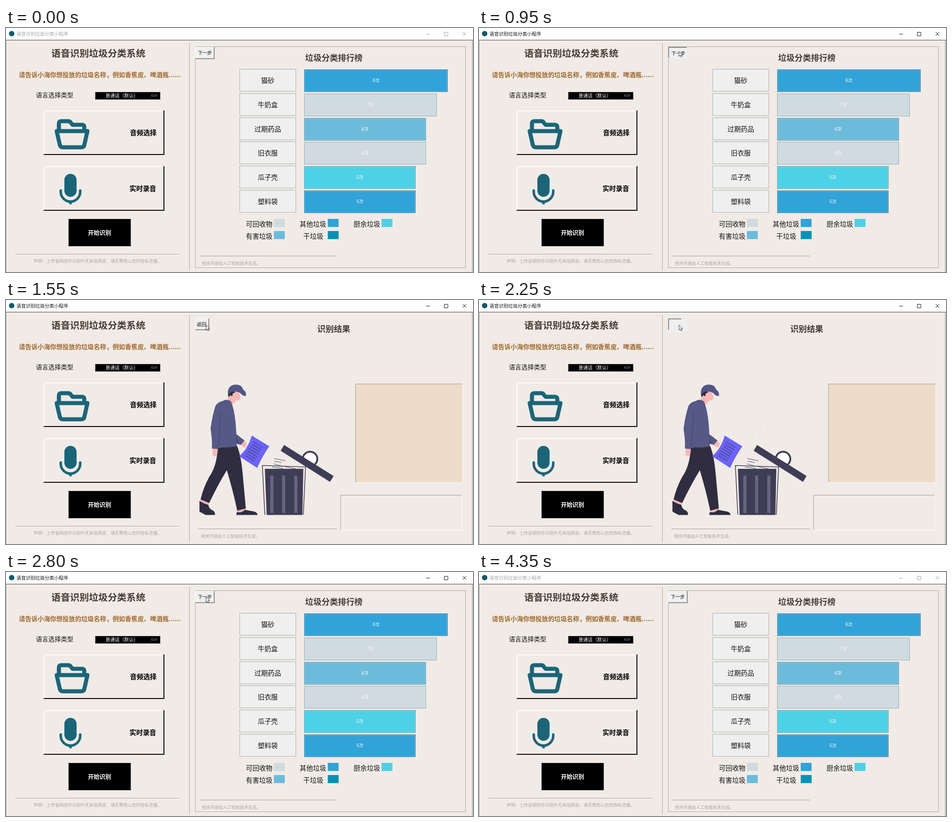
An HTML page that plays this animation: 1032 by 542 pixels, repeating every 4.4 s.

```html
<!DOCTYPE html>
<html lang="zh-CN">
<head>
<meta charset="utf-8">
<style>
html, body { margin: 0; width: 100%; height: 100%; overflow: hidden; background: #f0ebe6; }
svg { display: block; width: 1032px; height: 542px; }
text { font-family: "Noto Sans CJK SC", "Noto Sans CJK", sans-serif; white-space: pre; }
.crisp { shape-rendering: crispEdges; }
</style>
</head>
<body>
<svg id="stage" viewBox="0 0 1032 542"></svg>
<script>
const LOOP = 4400;
const TEAL = '#1b6579', INK = '#473b34', NAVY = '#2f2d3f', JACKET = '#565886', SKIN = '#f9b7b5', BIN = '#3f3d56';
const BLUE = '#30a3d9', PALE = '#cfdbe1', SKY = '#6dbbda', CYAN = '#4dd1e6', DEEP = '#0093b4';

// Vertical position is the middle of the glyphs.
const label = (s, x, mid, size, fill = '#111', extra = '') =>
  `<text x="${x}" y="${(mid + size * .38).toFixed(1)}" font-size="${size}" fill="${fill}" ${extra}>${s}</text>`;
const BOLD = 'font-weight="700"', CENTER = 'text-anchor="middle"';

const box = (x1, y1, x2, y2, fill, extra = '') =>
  `<rect class="crisp" x="${x1}" y="${y1}" width="${x2 - x1}" height="${y2 - y1}" fill="${fill}" ${extra}/>`;
const frame = (x1, y1, x2, y2, stroke, fill = 'none') =>
  box(x1 + .5, y1 + .5, x2 - .5, y2 - .5, fill, `stroke="${stroke}"`);
const bevel = (x1, y1, x2, y2, light, dark, w = 1, fill = 'none') =>
  box(x1, y1, x2, y2, fill) +
  box(x1, y1, x2, y1 + w, light) + box(x1, y1, x1 + w, y2, light) +
  box(x1, y2 - w, x2, y2, dark) + box(x2 - w, y1, x2, y2, dark);
const path = (d, fill, extra = '') => `<path d="${d}" fill="${fill}" ${extra}/>`;
const stroke = (d, color, w = 1, extra = '') => path(d, 'none', `stroke="${color}" stroke-width="${w}" ${extra}`);
const group = (id, body) => `<g id="${id}">${body}</g>`;

function titleBar() {
  return box(0, 0, 1032, 26, '#fff') +
    '<circle cx="12.5" cy="12.5" r="6" fill="#0d5a6c"/>' +
    group('caption',
      label('语音识别垃圾分类小程序', 23, 13, 10.4, 'currentColor') +
      stroke('M928 13.5H937M968.5 9.5H976.5V17.5H968.5ZM1009 9L1017 17M1017 9L1009 17', 'currentColor')) +
    box(0, 26, 1032, 28, '#8e8c8a') + box(0, 28, 1, 542, '#8e8c8a') +
    box(1, 28, 1030, 29, '#fff') + box(1, 28, 2, 542, '#fff') +
    box(1030, 28, 1031, 542, '#8e8c8a');
}

function controls() {
  const card = y => bevel(83, y, 350, y + 99, '#fff', '#000', 2);
  return box(405, 34, 406, 539, '#9c9996') + box(406, 34, 407, 539, '#faf7f4') +
    label('语音识别垃圾分类系统', 100, 56, 20.8, INK, BOLD) +
    label('请告诉小海你想投放的垃圾名称，例如香蕉皮、啤酒瓶......', 28.5, 103.5, 13.8, '#a0692f', BOLD) +
    label('语言选择类型', 66, 149, 13.8) +
    bevel(197, 142, 341, 159, '#55514e', '#3b3835', 1, '#000') +
    label('普通话（默认）', 220, 150.5, 10.3, '#fff') +
    frame(321, 148, 334, 152, '#77736f') +
    card(183) +
    stroke('M117 228V212Q117 207 122 207H138Q141 207 143 210L147 215H168Q173 215 173 220V228' +
      'M112 229H180L173 260Q172 265 167 265H126Q121 265 119 260Z', TEAL, 9, 'stroke-linejoin="round"') +
    label('音频选择', 274, 232, 14.7, '#000', BOLD) +
    card(307) +
    `<rect x="129" y="324" width="27" height="51" rx="13.5" fill="${TEAL}"/>` +
    stroke('M121 361V364A21.5 21.5 0 0 0 164 364V361', TEAL, 5.5, 'stroke-linecap="round"') +
    stroke('M142.5 384V391.5', TEAL, 6) +
    label('实时录音', 273, 356, 14.7, '#000', BOLD) +
    bevel(138, 424, 276, 485, '#3d3a37', '#4d4946', 1, '#000') +
    label('开始识别', 181, 454, 12.8, '#fff', BOLD) +
    box(21, 502, 383, 503, '#9c9996') + box(21, 503, 383, 504, '#faf7f4') +
    label('声明：上传音频除作识别外无其他用途，请无需担心您的隐私泄露。', 61, 517.5, 9.45, '#aaa6a2');
}

const notice = (x, y) =>
  box(x - 6, y - 16, 731, y - 15, '#9c9996') +
  label('相关内容由人工智能技术生成。', x, y, 9.3, '#aaa6a2');

function ranking() {
  const rows = [['猫砂', 8, BLUE], ['牛奶盒', 7, PALE], ['过期药品', 6, SKY],
    ['旧衣服', 6, PALE], ['瓜子壳', 5, CYAN], ['塑料袋', 5, BLUE]];
  const legend = [['可回收物', 530, 592, 0, PALE], ['其他垃圾', 649, 711, 0, BLUE], ['厨余垃圾', 768, 830, 0, CYAN],
    ['有害垃圾', 530, 592, 1, SKY], ['干垃圾', 657, 711, 1, DEEP]];
  return frame(418, 41, 1016, 533, '#aaa6a2') +
    label('垃圾分类排行榜', 661, 66, 18.15, INK, BOLD) +
    rows.map(([name, count, color], i) => {
      const y = Math.round(90.8 + i * 53.85), end = Math.round(786 + count * 23.7);
      return frame(516, y, 641, y + 50, '#aaa9a8', '#efefef') +
        label(name, 578.5, y + 25.5, 14.7, '#111', CENTER) +
        box(659, y + 1, end, y + 51, color) +
        frame(659, y + 1, end, y + 51, 'rgba(0,40,60,.35)') +
        frame(660, y + 2, end - 1, y + 50, 'rgba(255,255,255,.3)') +
        label(count + '次', (659 + end) / 2, y + 25.5, 10.3, '#f4fafc', CENTER);
    }).join('') +
    legend.map(([name, x, swatch, row, color]) =>
      label(name, x, 435 + row * 27, 14.7) +
      box(swatch, 424 + row * 27, swatch + 24, 442 + row * 27, color)).join('') +
    notice(433, 522);
}

const sorting = () =>
  label('为你分类中', 679, 64, 18.2, INK, BOLD) +
  frame(446, 96, 992, 299, '#d6d3d0') + frame(447, 97, 991, 298, '#a5a3a1', '#fff') +
  notice(431, 524);

function person() {
  return path('M430 442L449 451L446 459L430 450ZM510 466L529 462L531 470L511 475Z', SKIN) +
    path('M427.5 446Q436 452 447 455Q449 465 458 468Q462 471 462 477.5H441L427.5 470Z', NAVY) +
    path('M510 471Q520 474 528 466Q538 468 549 470Q556 473 556 477.5H509Z', NAVY) +
    path('M468 328L510 323Q519 342 523 386L530 463L511 468Q502 425 488 378Q469 409 449 451L430 443Q436 417 449 393Q466 369 468 328Z', NAVY) +
    path('M457 330H467Q469 341 464 347Q458 347 456 343ZM519 318L527 312L532 319L529 328L521 325Z', SKIN) +
    path('M495 207L512 203L518 213Q519 224 509 223L502 231Q493 235 487 227Z', SKIN) +
    path('M491 214Q489 205 497 202L508 204L501 208L500 214L495 211L494 215Z', NAVY) +
    path('M490 205Q492 188 508 188Q521 188 524 199Q532 204 530 213Q523 214 518 207Q506 200 496 205L491 210Z', '#535487') +
    path('M463 235Q467 227 480 224Q486 219 497 225Q507 248 509 298L527 312L519 322L510 319V325Q493 329 469 327V331L455 330Q456 310 452 286Q456 256 463 235Z', JACKET) +
    stroke('M475 250Q471 277 472 299Q470 315 469 328', '#454671', 1.2) +
    path('M509 299L514 321L510 318Z', '#454671') +
    path('M543 301L582 325Q568 344 555 373L515 347Q535 330 543 301Z', '#6c63ff') +
    Array.from({ length: 7 }, (_, i) =>
      stroke(`M${546 - i * 3} ${315 + i * 5}l21 13`, BIN, 1.2)).join('');
}

function trashCan() {
  const ribs = [584, 610, 637].map(x => box(x, 390, x + 7, 473, '#666480')).join('');
  return stroke('M572 477L566.5 367.5L662 371L657 477', BIN, 1.6) +
    path('M572 375H657L655 477.5H576Z', BIN) + ribs +
    stroke('M593 352L617 357M593 358L609 361M592 364L613 370M588 371L612 374M616 370L640 375', BIN, 1) +
    `<circle cx="672" cy="353" r="16" fill="#fff" stroke="${BIN}" stroke-width="4"/>` +
    path('M614.5 322L724 391L716 404L607 335Z', BIN) +
    [[637, 287], [619, 298], [697, 456]].map(([x, y]) => box(x, y, x + 1, y + 1, '#77747f')).join('');
}

const result = () =>
  label('识别结果', 688, 64, 18.2, INK, BOLD) + person() + trashCan() +
  bevel(772, 186, 1010, 406, '#a29a91', '#fff', 1, '#eddcc7') +
  bevel(739, 433, 1008, 512, '#9c9996', '#fff') +
  notice(431, 524);

const raised = (x2, y1, y2) =>
  bevel(418, y1, x2, y2, '#fff', '#74716e', 1, '#f0efef') +
  box(419, y2 - 2, x2 - 1, y2 - 1, '#aaa7a4') + box(x2 - 2, y1 + 1, x2 - 1, y2 - 1, '#aaa7a4');
const sunken = (x2, y1, y2) =>
  box(418, y1, x2 + 1, y2 + 2, '#f0eff0') +
  box(418, y1, x2, y1 + 2, '#8b8886') + box(418, y1, 420, y2, '#8b8886');

const buttons = {
  rankUp: raised(461, 42, 69) + label('下一步', 424, 55.5, 10.3),
  rankDown: sunken(459, 42, 67) + label('下一步', 425, 56.5, 10.3),
  sortUp: raised(459, 41, 67) + label('下一步', 422, 53.5, 10.3),
  sortDown: sunken(457, 41, 66) + label('下一步', 423, 54.5, 10.3),
  backUp: raised(449, 41, 67) + label('返回', 421.5, 53.5, 10.6),
  backDown: box(419, 42, 460, 70, '#efeef0') + sunken(447, 41, 66)
};
const pages = { ranking: ranking(), sorting: sorting(), result: result() };

const stage = document.getElementById('stage');
stage.innerHTML = box(0, 0, 1032, 542, '#f0ebe6') + titleBar() + controls() +
  Object.entries({ ...pages, ...buttons }).map(([id, body]) => group(id, body)).join('') +
  group('cursor', path('M0 0V11.5L2.7 9L4.5 13L6.4 12.1L4.7 8.2H8.2Z', '#fff', 'stroke="#222" stroke-width=".9"'));

// start, page, button, window active
const steps = [
  [0, 'ranking', 'rankUp', false],
  [900, 'ranking', 'rankDown', true],
  [1000, 'sorting', 'sortUp', true],
  [1400, 'sorting', 'sortDown', true],
  [1550, 'result', 'backUp', true],
  [2200, 'result', 'backDown', true],
  [2300, 'ranking', 'rankUp', true],
  [4150, 'ranking', 'rankUp', false]
];
const part = id => document.getElementById(id);
const show = (id, on) => part(id).setAttribute('visibility', on ? 'visible' : 'hidden');

function draw(t) {
  const [, page, button, active] = steps.findLast(step => step[0] <= t);
  Object.keys(pages).forEach(id => show(id, id === page));
  Object.keys(buttons).forEach(id => show(id, id === button));
  part('caption').style.color = active ? '#111' : '#a2a2a2';
  show('cursor', t >= 750 && t < 4150);
  const approach = Math.max(0, 1 - (t - 750) / 150);
  const y = t < 1100 ? 51.5 + approach * 40 : 55.5;
  part('cursor').setAttribute('transform', `translate(${442 + approach * 25} ${y})`);
}

function tick() {
  draw(performance.now() % LOOP);
  requestAnimationFrame(tick);
}
tick();
</script>
</body>
</html>
```
